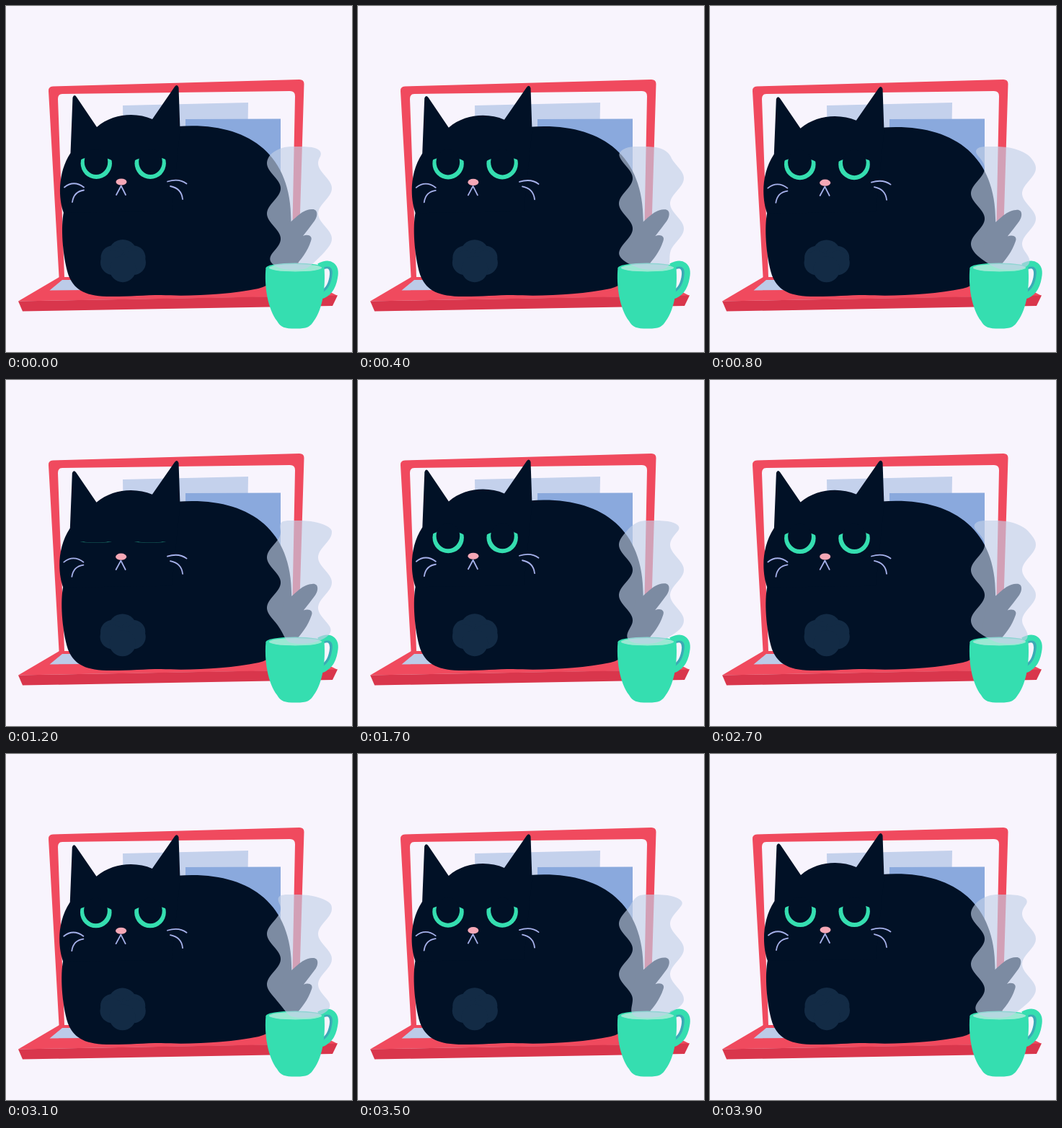
These frames come from a looping animation (480 by 480 pixels, 4 s). An HTML page:

```html
<!DOCTYPE html>
<html lang="en">
<head>
<meta charset="utf-8">
<title>Cat on a laptop</title>
<style>
  html, body { margin: 0; width: 100%; height: 100%; overflow: hidden; background: #f8f4fd; }
  svg { display: block; width: 100vw; height: 100vh; }
  .red { fill: #f04a5e; }
  .fur { fill: #011126; }
  .mint { fill: #35deb0; }
  .line { fill: none; stroke: #a6b1ea; stroke-width: 1.8; stroke-linecap: round; stroke-linejoin: round; }
</style>
</head>
<body>
<svg viewBox="0 0 480 480">
  <defs>
    <clipPath id="lid"><path d="M100 215Q125 201 150 216V245H100Z"/></clipPath>
    <g id="eye">
      <circle class="mint" cx="125.300" cy="218.300" r="21.700" clip-path="url(#lid)"/>
      <ellipse class="fur" cx="125" cy="216" rx="16.300" ry="18"/>
    </g>
  </defs>

  <g id="laptop">
    <path class="red" d="M74 376L17 409.500L460 402L405 374Z"/>
    <path fill="#d9364c" d="M17 409.500L460 401.500L453 416L23 423.500Z"/>
    <path class="red" d="M59 118Q58.500 112 65 111.500L407 102Q413.500 102 413.500 108L405 384L74 384Z"/>
    <path fill="#f8f4fd" d="M72 129Q72 122 78 122L394 118Q401 118 401 125L396 376L81 376Z"/>
    <path fill="#c4d1ec" d="M162 138L336 134L335 200H163Z"/>
    <path fill="#8aa9dd" d="M249 157L381 156.500V260H249Z"/>
    <path fill="#bccbe8" d="M78 380L60.500 394.500L110 394V380Z"/>
  </g>

  <g id="cat">
    <path class="fur" d="M80 286C76 305 78 345 86.500 373C94 392 107 402 140 403C168 403.500 190 401 215 401
      C255 403 310 400.500 350 392C385 384 396 340 395.500 298C396 200 330 160 238 167L120 240Z"/>
    <path class="fur" d="M385 306C400 299 407 283 424 282C433 281 433 291 428 298Q420 309 412 319
      C419 316 426 319 423 326C418 341 410 351 400 362L370 375Z"/>
    <g fill="#132b45">
      <circle cx="162" cy="344" r="20"/>
      <circle cx="148" cy="349" r="16.500"/>
      <circle cx="177" cy="349" r="16.500"/>
      <circle cx="148" cy="356" r="17"/>
      <circle cx="177" cy="356" r="17"/>
      <circle cx="162" cy="365" r="18.200"/>
    </g>
    <path class="fur" d="M80 287C73 268 71 232 89.500 204L92.500 127Q94.500 121.500 98 126.500L126 168
      C148 149 180 147 203 157L234 112Q237.500 107.500 239.500 113L241.500 172L230 285Z"/>
    <g id="eyes">
      <use href="#eye"/>
      <use href="#eye" transform="translate(325.500) scale(-1 1)"/>
    </g>
    <path class="line" d="M153 262L159.700 249.500L166 262M81 251.500Q94 241 108 251.500M92 272Q94 257.500 108 255.500
      M224 243.500Q240 238.500 250.500 246.500M228 250Q243.500 253 245 268"/>
    <ellipse fill="#f6a8b6" cx="160" cy="244" rx="7.500" ry="4.600"/>
  </g>

  <g id="mug" fill="none">
    <path stroke="#3aaab5" stroke-width="8" d="M437 363C449 356 455 363 452.500 377C450 390 444 397 436 399"/>
    <path stroke="#35deb0" stroke-width="8" d="M434 361C450 353 459.500 360 456 377C453.500 392 446 400 436 403"/>
    <ellipse class="mint" cx="401" cy="363.500" rx="40.500" ry="7"/>
    <ellipse fill="#9be8d3" cx="401.500" cy="363.500" rx="37" ry="5.500"/>
  </g>
  <path id="steam" fill="#c3d0e8" fill-opacity=".64"/>
  <path class="mint" d="M360.500 363C358 388 363 420 376 437C381 446 387 447.500 401 447.500S421 447 427 437
    C440 420 443.500 388 441.500 363H438.500A37 5.500 0 0 1 364.500 363Z"/>
</svg>
<script>
const LOOP = 4000, STEP = 100, CYCLE = 2000, TAU = 2 * Math.PI;
const $ = id => document.getElementById(id);
const blink = [[1000, 1], [1200, .04], [1300, .04], [1500, 1]];

function lidAt(t) {
  if (t <= blink[0][0]) return 1;
  for (let i = 1; i < blink.length; i++) {
    const [a, from] = blink[i - 1], [b, to] = blink[i];
    if (t <= b) return from + (to - from) * (t - a) / (b - a);
  }
  return 1;
}

// Horizontal inset of an elliptical corner at distance d from its flat end.
function corner(d, rx, ry) {
  return d >= ry ? 0 : rx * (1 - Math.sqrt(1 - (1 - d / ry) ** 2));
}

// Wavy column with rounded ends; the wave climbs one length per cycle.
function steamPath(t) {
  const top = 195, bottom = 366, length = 70, width = 71;
  const left = [], right = [];
  for (let y = top; y <= bottom; y++) {
    const x = 371.5 - 9.5 * Math.cos(TAU * ((y - 218) / length + t / CYCLE));
    const foot = corner(bottom - y, 30, 25);
    const a = x + corner(y - top, 18, 13) + foot;
    const b = x + width - corner(y - top, 34, 15) - foot;
    left.push(`${a.toFixed(2)} ${y}`);
    right.unshift(`${b.toFixed(2)} ${y}`);
  }
  return `M${left.concat(right).join("L")}Z`;
}

function scaleAt(id, x, y, sx, sy) {
  $(id).setAttribute("transform", `translate(${x} ${y}) scale(${sx} ${sy}) translate(${-x} ${-y})`);
}

function draw(t) {
  const breath = (1 - Math.cos(TAU * t / CYCLE)) / 2;
  scaleAt("cat", 237, 403, 1 + .005 * breath, 1 - .008 * breath);
  scaleAt("eyes", 0, 223.5, 1, lidAt(t));
  $("steam").setAttribute("d", steamPath(t));
}

const start = performance.now();
function tick() {
  const t = (performance.now() - start) % LOOP;
  draw(Math.floor(t / STEP) * STEP);
  requestAnimationFrame(tick);
}
tick();
</script>
</body>
</html>
```
